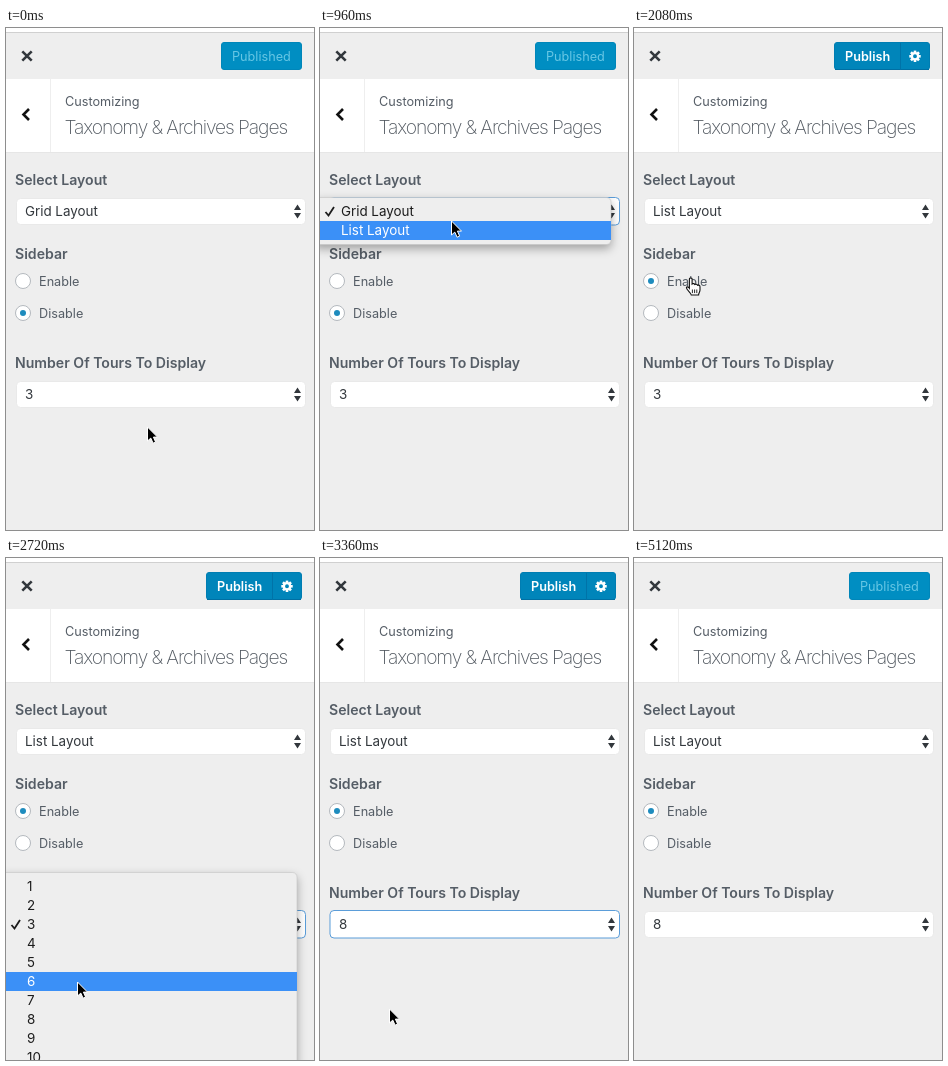
An HTML page that plays this animation: 308x502 px, repeating every 5.28 s.

```html
<!DOCTYPE html>
<html lang="en">
<head>
<meta charset="utf-8">
<title>Customizer panel</title>
<style>
  html, body { margin: 0; width: 100%; height: 100%; overflow: hidden; background: #eee; }
  svg { display: block; width: 308px; height: 502px; font: 13.4px Inter, "Open Sans", sans-serif; fill: #32373c; }
  .small { font-size: 12.7px; fill: #555d66; }
  .label { font-size: 14.1px; font-weight: 600; fill: #555d66; }
  .title { font-size: 19.3px; font-weight: 200; letter-spacing: -1.1px; fill: #50575f; }
  .button { font-size: 12.7px; }
  .popup { filter: drop-shadow(0 4px 5px rgba(0, 0, 0, .32)); }
</style>
</head>
<body>
<svg id="stage" viewBox="0 0 308 502"></svg>
<script>
const STEP = 160, STEPS = 33;
const stage = document.getElementById('stage');

// Pointer stops: [step, x, y]
const stops = [
  [0, 142, 400], [1, 142, 392], [4, 135, 186], [5, 134, 186], [6, 132, 194],
  [8, 132, 194], [12, 58, 252], [13, 57, 250], [15, 74, 366], [16, 74, 372],
  [17, 72, 425], [18, 71, 439], [19, 70, 452], [22, 70, 452],
  [25, 163, 332], [28, 234, 30], [29, 236, 24], [33, 236, 24]
];

const rect = (x, y, w, h, fill, extra = '') =>
  `<rect x="${x}" y="${y}" width="${w}" height="${h}" fill="${fill}" ${extra}/>`;
const text = (x, y, str, attrs = '') => `<text x="${x}" y="${y}" ${attrs}>${str}</text>`;
const stroke = (d, color, width) =>
  `<path d="${d}" fill="none" stroke="${color}" stroke-width="${width}"/>`;

function pointerAt(step) {
  const i = Math.max(1, stops.findIndex(s => s[0] >= step));
  const [s0, x0, y0] = stops[i - 1], [s1, x1, y1] = stops[i];
  const p = (step - s0) / (s1 - s0);
  const e = s1 - s0 > 2 ? p * p * (3 - 2 * p) : p;
  return [x0 + (x1 - x0) * e, y0 + (y1 - y0) * e];
}

function panel() {
  return rect(0, 0, 308, 502, '#eee') + rect(0, 0, 308, 4, '#fff') +
    rect(0, 4, 308, 1, '#d0d0d0') +
    stroke('M16.3 23.3l9.4 9.4m0-9.4l-9.4 9.4', '#32373c', 2.6) +
    rect(0, 51, 308, 73, '#fff') + rect(44, 51, 1, 73, '#eee') +
    rect(0, 124, 308, 1, '#e6e6e6') +
    stroke('M23 81l-5.5 5.5 5.5 5.5', '#111', 2.6) +
    text(59, 78, 'Customizing', 'class="small"') +
    text(58.5, 106, 'Taxonomy &amp; Archives Pages', 'class="title"') +
    text(9, 157, 'Select Layout', 'class="label"') +
    text(9, 231, 'Sidebar', 'class="label"') +
    text(9, 340, 'Number Of Tours To Display', 'class="label"');
}

function gear(x, y) {
  let teeth = '';
  for (let a = 0; a < 360; a += 45)
    teeth += rect(-1.3, -5.7, 2.6, 3, '#fff', `transform="rotate(${a})"`);
  return `<g transform="translate(${x} ${y})">${teeth}
    <circle r="3.1" fill="none" stroke="#fff" stroke-width="2.3"/></g>`;
}

function publishButton(published, hover, disabled) {
  if (published)
    return rect(215.5, 14.5, 80, 27, '#008ec2', 'rx="2.5" stroke="#0086b9"') +
      text(226, 33, 'Published', 'class="button" fill="#66c6e4"');
  return rect(200.5, 14.5, 95, 27, '#0085ba', 'rx="2.5" stroke="#007db2"') +
    (hover ? rect(201, 15, 65, 26, '#008ec2') : '') +
    rect(201, 41, 94, 1, '#006fa3') + rect(266, 15, 1, 27, '#0073a8') +
    text(211, 33, 'Publish', `class="button" font-weight="600" fill="${disabled ? '#66c6e4' : '#fff'}"`) +
    gear(281, 28.3);
}

function select(y, value, focus) {
  const box = focus
    ? rect(10, y - .5, 289.5, 27.5, '#fff', 'rx="4" stroke="#5b9dd9"')
    : rect(10.5, y + .5, 289, 26, '#fff', 'rx="4" stroke="#e9e9e9"');
  return box + text(19, y + 18, value) +
    `<path d="M288 ${y + 12}l3.5-5.5 3.5 5.5zm0 3l3.5 5.5 3.5-5.5z"/>`;
}

function radio(y, label, on) {
  return `<circle cx="17" cy="${y}" r="7.5" fill="#fff" stroke="#b4b9be"/>` +
    (on ? `<circle cx="17" cy="${y}" r="3" fill="#1e8cbe"/>` : '') +
    text(33, y + 5, label, 'class="small"');
}

function popup(top, items, checked, hover) {
  const height = items.length * 19 + 9;
  const rows = items.map((item, i) => {
    const y = top + 4.5 + i * 19, lit = i === hover, color = lit ? '#fff' : '#1c1c1c';
    return (lit ? rect(0, y, 291, 19, '#3b90f7') : '') +
      (i === checked ? stroke(`M5.5 ${y + 10}l3 3.6 5.5-8.6`, color, 1.8) : '') +
      text(21, y + 14.2, item, `fill="${color}"`);
  });
  return `<g class="popup">${rect(-6, top, 297, height, '#eee', 'rx="4.5" stroke="#c4c4c4" stroke-width=".6"')}</g>` +
    rows.join('');
}

function pointer(x, y, hand) {
  const arrow = 'M-.5-1V13L2.8 10.1L5.1 15.2L7.6 14.1L5.4 9.1H9.5Z';
  const palm = 'M-1.6 1.2C-1.6-.5 1.1-.5 1.1 1.2V6C2 5.2 3.5 5.6 3.8 6.5C4.8 5.9 6.2 6.3 6.5 7.3' +
    'C7.7 6.8 9 7.4 9 8.8V12C9 14 7.6 15 7.6 17H.3C0 15-4.6 11.6-4.6 9.8C-4.4 8.2-2.6 8.8-1.6 10.3Z';
  return `<g transform="translate(${x} ${y})">` + (hand
    ? `<path d="${palm}" fill="#fff" stroke="#111" stroke-width="1.1"/>` +
      stroke('M1.4 11.5v3.6M3.6 11.5v3.6M5.8 11.5v3.6', '#111', .9)
    : `<path d="${arrow}" fill="#000" stroke="#fff" stroke-width="1" stroke-linejoin="round"/>`) + '</g>';
}

const within = (step, from, to) => step >= from && step < to;
const layouts = ['Grid Layout', 'List Layout'];
const counts = Array.from({ length: 12 }, (_, i) => i + 1);
const countHover = { 16: 2, 17: 5, 18: 6, 19: 7, 20: -1 };

function draw(step) {
  const [x, y] = pointerAt(step);
  const enabled = step >= 13;
  const hand = within(step, 12, 14) || within(step, 28, 31);
  const published = step < 7 || step >= 31;
  stage.innerHTML = panel() +
    publishButton(published, within(step, 28, 31), step === 30) +
    select(170, layouts[step < 7 ? 0 : 1], within(step, 5, 13)) +
    radio(253, 'Enable', enabled) + radio(285, 'Disable', !enabled) +
    select(353, step < 21 ? 3 : 8, within(step, 16, 30)) +
    (within(step, 5, 7) ? popup(169.5, layouts, 0, step - 5) : '') +
    (within(step, 16, 21) ? popup(314.5, counts, 2, countHover[step]) : '') +
    (step < 32 ? pointer(x, y, hand) : '');
}

const start = performance.now();
let shown = -1;
function tick() {
  const step = Math.floor((performance.now() - start) / STEP) % STEPS;
  if (step !== shown) draw(shown = step);
  requestAnimationFrame(tick);
}
tick();
</script>
</body>
</html>
```
